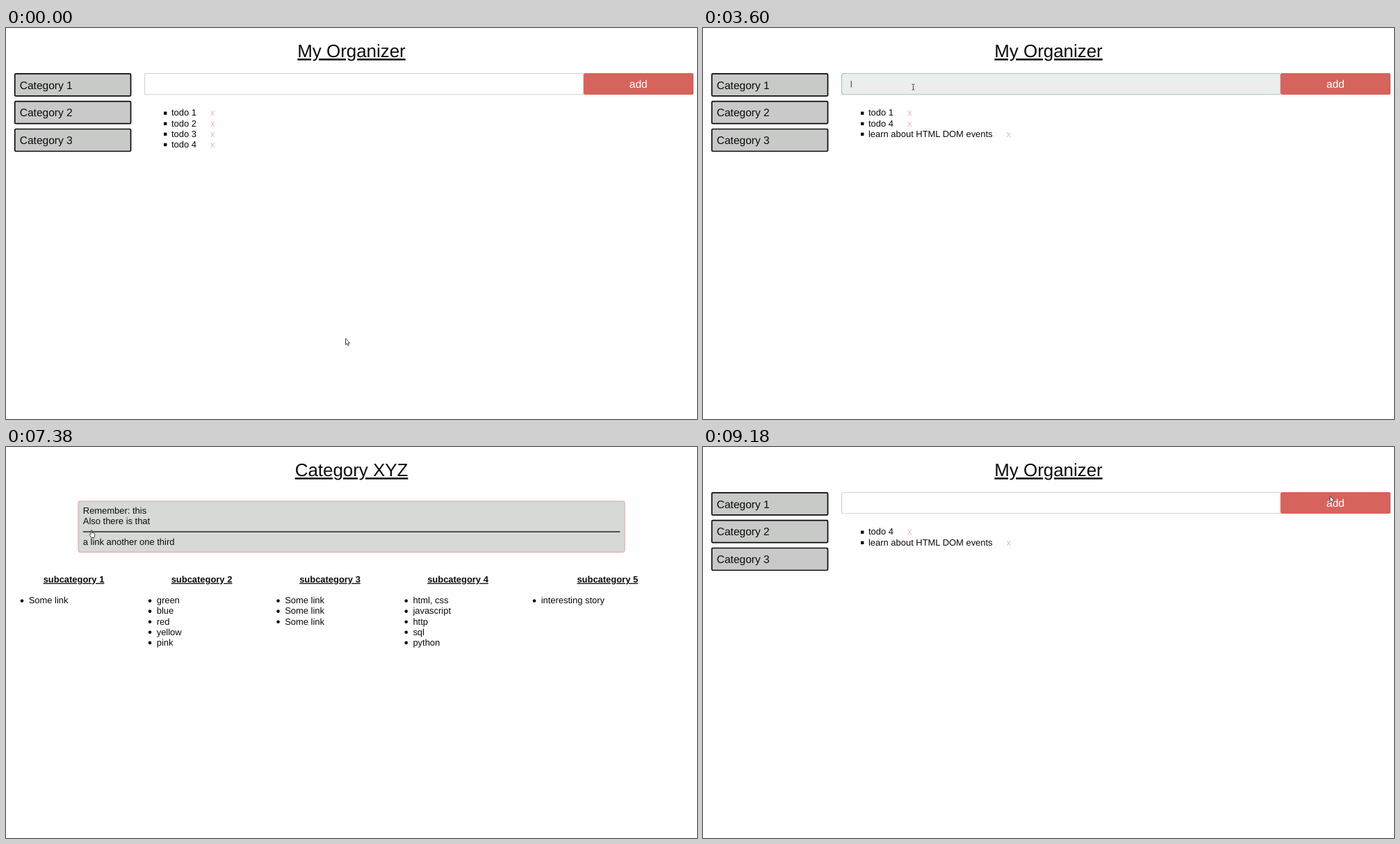
Write an HTML page that moves like this. It is 994 by 563 pixels and loops after 9360 ms.

```html
<!DOCTYPE html>
<html lang="en">
<head>
<meta charset="utf-8">
<title>My Organizer</title>
<style>
html, body { margin: 0; width: 100%; height: 100%; overflow: hidden; background: #fdfefd; }
svg { display: block; font: 12.95px "Liberation Sans", Arial, sans-serif; fill: #0b0b0b; text-rendering: geometricPrecision; }
text { white-space: pre; }
.title { font-size: 25.9px; text-anchor: middle; text-decoration: underline; }
.head { font-weight: bold; text-anchor: middle; text-decoration: underline; }
.big { font-size: 15.55px; }
.typed { font-size: 8.64px; }
.add { fill: #fff; text-anchor: middle; }
.del { fill: #efb8bc; }
.cursor { fill: #fff; stroke: #333; stroke-width: .9; stroke-linejoin: round; }
</style>
</head>
<body>
<svg id="stage" width="994" height="563" viewBox="0 0 994 563"></svg>
<script>
const STEP = 180, LOOP = 9360;
const stage = document.getElementById('stage');
const TASK = 'learn about HTML DOM events', NEW = 'a new todo';

const text = (x, y, s, cls = '') => `<text x="${x}" y="${y}" class="${cls}">${s}</text>`;
const rect = (x, y, w, h, fill, more = '') =>
  `<rect x="${x}" y="${y}" width="${w}" height="${h}" fill="${fill}" ${more}/>`;
const between = (n, a, b) => n >= a && n <= b;

// [first step, shape, x, y]; each holds until the next one
const moves = [
  [0, 'arrow', 488.5, 447], [1, 'arrow', 15, 290], [2, 'arrow', 500, 15], [3, 'arrow', 916, 300],
  [4, 'beam', 418, 89], [16, 'arrow', 360, 112], [17, 'hand', 297, 138], [20, 'beam', 302.5, 85],
  [27, 'arrow', 312, 128], [28, 'hand', 324, 168], [31, 'arrow', 230, 120], [32, 'hand', 138, 89],
  [38, 'hand', 124, 125], [46, 'arrow', 210, 128], [47, 'arrow', 280, 125], [48, 'hand', 297, 123],
  [49, 'arrow', 310, 118], [50, 'beam', 640, 87], [51, 'arrow', 902, 70.5]
];

const shapes = {
  arrow: 'M0 0V9L2 7.3L3.4 10.3L4.8 9.7L3.5 6.7H6.2Z',
  beam: 'M-2 -4H-.5L0 -3.5L.5 -4H2M0 -3.5V3.5M-2 4H-.5L0 3.5L.5 4H2',
  hand: 'M-2 1V-5Q-1.2 -6.4 -.4 -5V-1.5L2.8 -.8Q4 -.4 3.8 1.2L2.8 5.5H-1.2L-4 1.4Q-3.6 -.2 -2 1Z'
};

function cursor(n) {
  const [, shape, x, y] = moves.filter(m => m[0] <= n).pop();
  const fill = shape === 'beam' ? ' fill="none"' : '';
  return `<path class="cursor" d="${shapes[shape]}" transform="translate(${x} ${y})"${fill}/>`;
}

function todos(n) {
  const list = [];
  if (n < 49) list.push('todo 1');
  if (n < 18) list.push('todo 2');
  if (n < 19) list.push('todo 3');
  list.push('todo 4');
  if (n >= 15) list.push(TASK);
  if (between(n, 25, 29)) list.push(NEW);
  return list;
}

function typed(n) {
  if (between(n, 4, 14)) return TASK.slice(0, Math.floor(6 + 2.63 * (n - 6)));
  return between(n, 20, 24) ? NEW.slice(0, Math.floor(2.6 * (n - 20))) : '';
}

function home(n) {
  const hover = n === 32 || n === 37 ? 0 : between(n, 38, 45) ? 1 : -1;
  const focus = between(n, 4, 14) || between(n, 20, 24);
  const edge = !focus ? '#d0d2d0' : n === 4 || n === 20 ? '#a3c4c9' : '#70ccda';
  let s = text(497, 42, 'My Organizer', 'title');
  for (let i = 0; i < 3; i++) {
    const y = 65.9 + i * 39.8;
    s += rect(12.7, y, 166.8, 32, '#c8cac8', `rx="1.5" stroke="${i === hover ? '#d6635c' : '#0b0b0b'}" stroke-width="1.7"`)
      + text(19.7, y + 21.6, 'Category ' + (i + 1), 'big');
  }
  s += rect(199.5, 65.5, 631, 30.3, focus ? '#ebeeec' : '#fdfefd', `rx="2" stroke="${edge}" stroke-width="1.1"`)
    + rect(831, 65, 158, 31, '#d6635c', 'rx="2"')
    + text(909.8, 86.3, 'add', 'big add');
  todos(n).forEach((item, i) => {
    const y = 126.4 + i * 15.1;
    s += rect(227, y - 5.9, 4.4, 4.4, '#0b0b0b')
      + text(238, y, `${item}<tspan dx="20" class="del">x</tspan>`);
  });
  if (focus) {
    const value = typed(n);
    s += `<text id="value" class="typed" x="213" y="83.4">${value}</text>`
      + rect(212.8, 76, .9, 9.5, '#222', 'id="caret"');
    if (value.startsWith('learn ')) s += rect(213, 84.7, 19, .8, '#d66');
    if (value.startsWith('learn about ')) s += rect(234.6, 84.7, 21.6, .8, '#d66');
  }
  return s;
}

const columns = [
  [23, 97.5, 'Some link'],
  [207, 281.5, 'green', 'blue', 'red', 'yellow', 'pink'],
  [391.5, 466, 'Some link', 'Some link', 'Some link'],
  [575.7, 650, 'html, css', 'javascript', 'http', 'sql', 'python'],
  [760, 865.3, 'interesting story']
];

function categoryPage() {
  let s = text(497, 42, 'Category XYZ', 'title')
    + rect(104, 78, 786, 73.4, '#d7d9d7', 'rx="2.5" stroke="#dc9f9c"')
    + text(110.8, 96.3, 'Remember: this') + text(110.8, 111.4, 'Also there is that')
    + rect(110.8, 121.4, 772.4, 1.3, '#0b0b0b')
    + text(110.8, 141.4, 'a link another one third');
  columns.forEach(([x, mid, ...items], c) => {
    s += text(mid, 194.9, 'subcategory ' + (c + 1), 'head');
    items.forEach((item, i) => {
      const y = 225.3 + i * 15.1;
      s += `<circle cx="${x}" cy="${y - 3.8}" r="2.3"/>` + text(x + 9.7, y, item);
    });
  });
  return s;
}

function draw(n) {
  const onPage = between(n, 33, 36) || between(n, 40, 42);
  stage.innerHTML = (onPage ? categoryPage() : home(n)) + cursor(n);
  const value = document.getElementById('value');
  if (value && value.textContent)
    document.getElementById('caret').setAttribute('x', 213 + value.getComputedTextLength());
}

let last = -1;
const start = performance.now();
function tick() {
  const n = Math.floor((performance.now() - start) % LOOP / STEP);
  if (n !== last) draw(last = n);
  requestAnimationFrame(tick);
}
tick();
</script>
</body>
</html>
```
